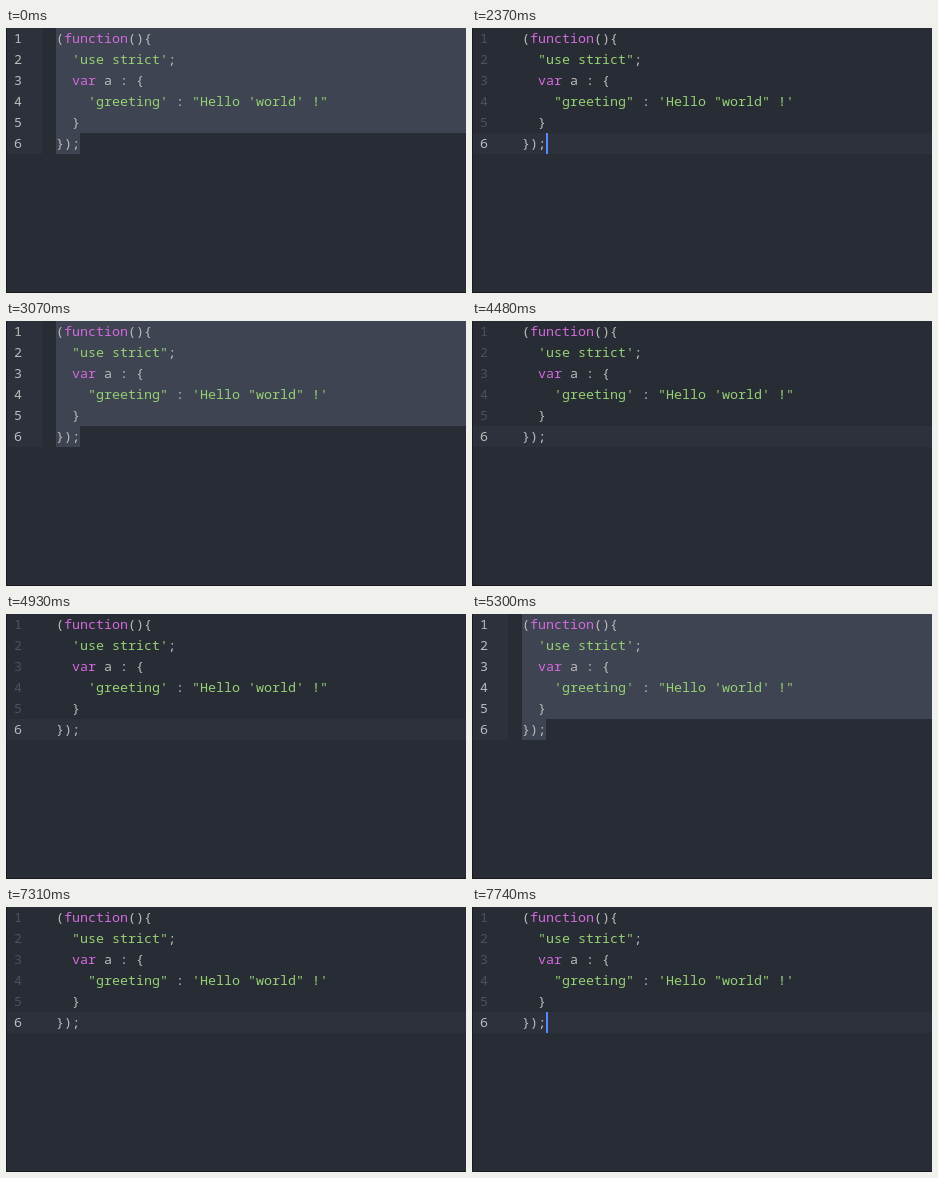
Recreate the animation shown at these times as an HTML page. Size 460x265 px, loop 7870 ms.

```html
<!DOCTYPE html>
<html lang="en">
<head>
<meta charset="utf-8">
<style>
  html, body { margin: 0; width: 100%; height: 100%; overflow: hidden; background: #282c34; }
  svg { display: block; }
  text { font: 13.333px "Noto Sans Mono", monospace; white-space: pre; fill: #bbb; }
  .key { fill: #d46ade; }
  .str { fill: #96d075; }
  .dim { fill: #4b5160; }
  .active { fill: #2c313c; }
  .selection { fill: #3e4451; }
</style>
</head>
<body>
<svg width="460" height="265" viewBox="0 0 460 265">
  <g id="selected">
    <path class="active" d="M1 0h35v126H1z"/>
    <path class="selection" d="M50 0h410v105H74v21H50z"/>
  </g>
  <path id="line" class="active" d="M1 105h459v21H1z"/>
  <path fill="#181a1f" d="M0 0h1v264h459v1H0z"/>
  <g id="numbers"></g>
  <g id="single"></g>
  <g id="double"></g>
  <path id="cursor" fill="#528bff" d="M74 105h2v21h-2z"/>
</svg>
<script>
const LOOP = 7870, ROW = 21;
const $ = id => document.getElementById(id);

const key = s => `<tspan class="key">${s}</tspan>`;
const str = s => `<tspan class="str">${s}</tspan>`;
const swapQuotes = s => s.replace(/['"]/g, q => q === "'" ? '"' : "'");

const code = quote => [
  `(${key('function')}(){`,
  `  ${str(quote("'use strict'"))};`,
  `  ${key('var')} a : {`,
  `    ${str(quote("'greeting'"))} : ${str(quote(`"Hello 'world' !"`))}`,
  '  }',
  '});'
];
const rows = (x, lines) => lines.map((s, i) => `<text x="${x}" y="${15 + i * ROW}">${s}</text>`).join('');

$('numbers').innerHTML = rows(8, [1, 2, 3, 4, 5, 6]);
$('single').innerHTML = rows(50, code(s => s));
$('double').innerHTML = rows(50, code(swapQuotes));

const within = (t, spans) => spans.some(([from, to]) => t >= from && t < to);
const show = (id, on) => $(id).style.display = on ? '' : 'none';

function draw(now) {
  const t = now % LOOP;
  const selected = within(t, [[0, 2370], [3070, 4480], [5300, 6510]]);
  const doubled = within(t, [[2370, 4480], [6510, LOOP]]);
  show('selected', selected);
  show('line', !selected);
  show('single', !doubled);
  show('double', doubled);
  show('cursor', within(t, [[2370, 2490], [2920, 3070], [4630, 4930], [6910, 7310], [7740, LOOP]]));
  [...$('numbers').children].forEach((n, i) => n.classList.toggle('dim', !selected && i < 5));
}

let start;
function tick(now) {
  start ??= now;
  draw(now - start);
  requestAnimationFrame(tick);
}
draw(0);
requestAnimationFrame(tick);
</script>
</body>
</html>
```
